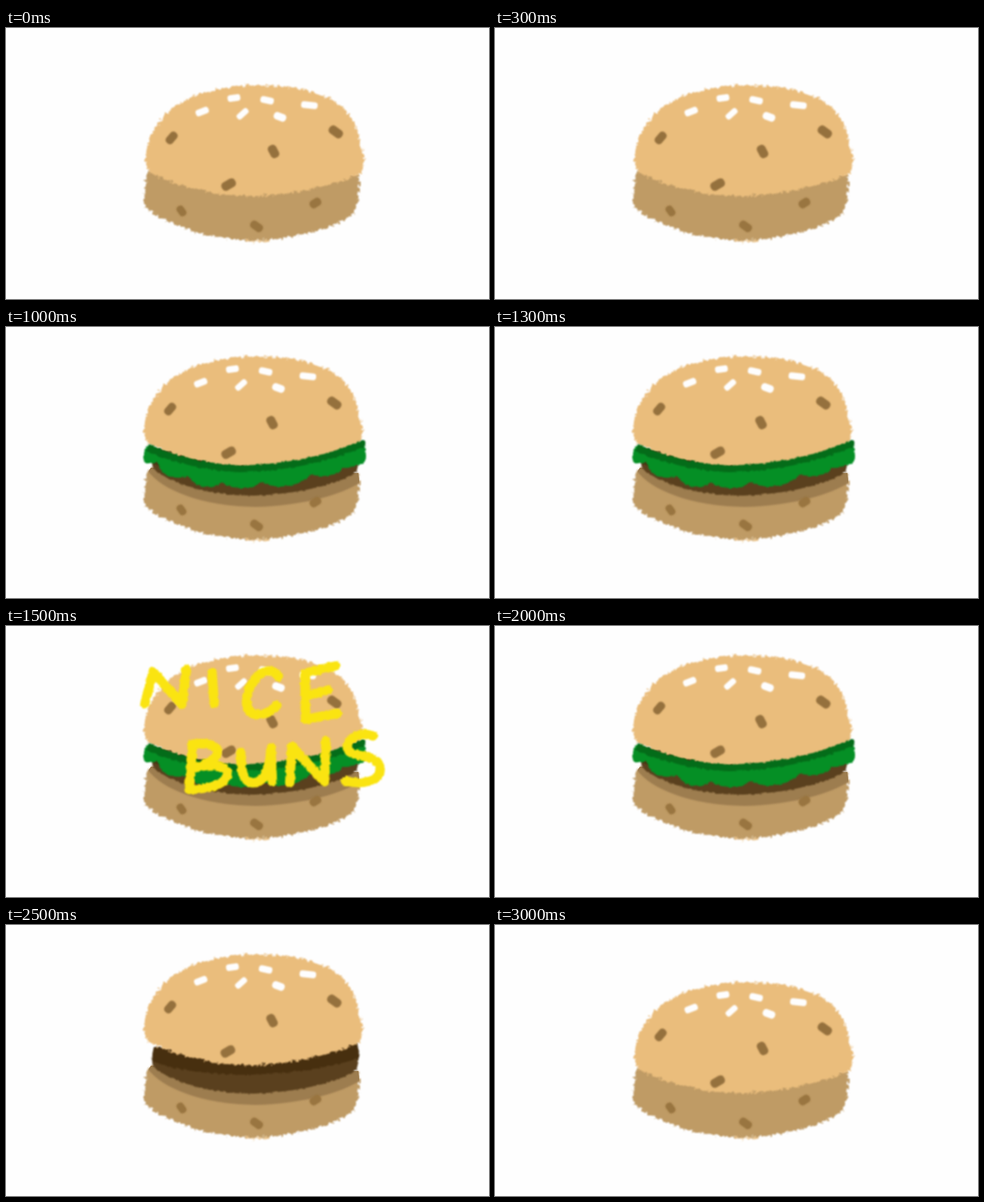
Write an HTML page that moves like this. It is 640 by 360 pixels and loops after 3500 ms.

```html
<!DOCTYPE html>
<html lang="en">
<head>
<meta charset="utf-8">
<title>Burger</title>
<style>
  html, body { margin: 0; width: 100%; height: 100%; overflow: hidden; background: #fefefe; }
  svg { display: block; width: 100vw; height: 100vh; }
  #words path { fill: none; stroke: #fae411; stroke-width: 12.5; stroke-linecap: round; stroke-linejoin: round; }
</style>
</head>
<body>
<svg viewBox="0 0 640 360">
  <defs>
    <filter id="chalk" filterUnits="userSpaceOnUse" x="0" y="0" width="640" height="360" color-interpolation-filters="sRGB">
      <feTurbulence type="fractalNoise" baseFrequency=".22" numOctaves="3" seed="4"/>
      <feDisplacementMap in="SourceGraphic" scale="9" xChannelSelector="R" yChannelSelector="G"/>
      <feGaussianBlur stdDeviation=".8"/>
    </filter>
    <filter id="brush" filterUnits="userSpaceOnUse" x="0" y="0" width="640" height="360" color-interpolation-filters="sRGB">
      <feTurbulence type="fractalNoise" baseFrequency=".2" numOctaves="2" seed="9"/>
      <feDisplacementMap in="SourceGraphic" scale="4" xChannelSelector="R" yChannelSelector="G"/>
      <feGaussianBlur stdDeviation=".9"/>
    </filter>
    <filter id="soft" filterUnits="userSpaceOnUse" x="0" y="0" width="640" height="360">
      <feGaussianBlur stdDeviation="1.2"/>
    </filter>
    <clipPath id="baseClip">
      <path id="baseShape" d="M192 187C184 196 182 222 184 236C194 250 238 271 288 279C318 283 347 283 374 278C412 271 440 262 457 250C467 241 470 214 467 194Z"/>
    </clipPath>
  </defs>

  <g filter="url(#chalk)">
    <use href="#baseShape" fill="#bf9b65"/>
    <path d="M318 282.500Q334 284.500 349 282" fill="none" stroke="#eabd7c" stroke-width="1.500"/>
  </g>

  <g id="patty">
    <path clip-path="url(#baseClip)" filter="url(#soft)" fill="#9d7d50"
      d="M187 190C206 217 260 238 330 239C390 238 445 223 470 206V180H190Z"/>
    <g filter="url(#brush)">
      <path fill="#5a401e" d="M196 163C193 173 193 182 195 188C222 211 272 224 328 224C388 222 440 209 464 193C468 183 468 170 466 156L330 170Z"/>
      <path fill="#472f0f" d="M196 162C194 169 194 176 195 181C222 193 272 199 322 199C382 197 432 189 467 177C468 169 468 162 466 156L330 170Z"/>
    </g>
  </g>
  <g id="baseSpots" filter="url(#soft)" fill="#99753f"></g>

  <g id="lid">
    <path filter="url(#chalk)" fill="#eabd7c"
      d="M185 172C186 150 196 129 214 113C238 89 280 76 335 76C385 76 428 87 448 107C463 123 470 148 474 172C475 184 472 191 466 196C430 210 380 222 325 223.500C270 223 216 207 191 191C186 187 185 180 185 172Z"/>
    <g id="lidSpots" filter="url(#soft)" fill="#95713e"></g>
    <g id="seeds" filter="url(#soft)" fill="#fefefe"></g>
  </g>
  <g id="lowSpot" filter="url(#soft)" fill="#95713e"></g>

  <g id="leaf" filter="url(#brush)">
    <path fill="#058f25"
      d="M188 156C180 164 181 175 184 180Q190 184 200 179Q206 199 225 200Q234 201 241 197Q247 210 265 212Q277 213 286 206Q297 214 312 214Q328 214 338 206Q350 212 366 212Q391 210 404 196Q420 200 433 196Q442 194 446 187Q456 188 465 183Q478 183 477 170L474 151Q400 183 310 185Q240 180 188 156Z"/>
    <path fill="#046c19"
      d="M188 155Q240 180 310 184Q400 182 474 150Q478 152 475 159Q400 191 310 193Q240 189 187 165Z"/>
  </g>

  <g id="words" filter="url(#brush)" role="img" aria-label="NICE BUNS">
    <path d="M184 103L195 61L233 104L239 58"/>
    <path d="M273 62L276 103"/>
    <path d="M361 67C353 56 340 58 330 71C317 88 314 111 328 117C340 120 351 114 359 105"/>
    <path d="M436 53L396 63L397 124L439 116M398 93L427 85"/>
    <path d="M247 157L243 217M247 157C268 154 284 160 280 170C276 179 264 184 252 188C278 181 296 187 293 199C289 212 264 217 243 217"/>
    <path d="M311 168C311 190 314 206 325 208C341 210 350 192 351 162L353 207"/>
    <path d="M376 208L379 160L422 207L424 153"/>
    <path d="M486 146C470 140 453 149 452 160C452 171 468 171 482 175C498 180 499 195 490 202C480 209 464 209 450 206"/>
  </g>
</svg>

<script>
  const $ = id => document.getElementById(id);

  // Each blob: x, y, angle, half length, half width
  function blobs(id, list) {
    $(id).innerHTML = list.map(([x, y, turn, a, b]) =>
      `<rect x="${-a}" y="${-b}" width="${2 * a}" height="${2 * b}" rx="${b * .85}"
        transform="translate(${x} ${y}) rotate(${turn})"/>`).join('');
  }
  blobs('seeds', [
    [260, 111, -22, 9, 4.5], [302, 93, -8, 8.5, 4.5], [346, 96, 12, 9, 4.5],
    [402, 102.5, 6, 11, 4.5], [313.5, 114, -42, 9, 4], [363, 118, 20, 8.5, 5]
  ]);
  blobs('lidSpots', [[219.5, 146, -50, 9, 5.5], [354.5, 164, 62, 9, 6], [437, 138, 35, 10, 6]]);
  blobs('lowSpot', [[295, 208, -30, 10, 6]]);
  blobs('baseSpots', [[232.5, 243, 55, 7.5, 5], [332, 263.5, 35, 9, 5.5], [410, 232.5, -32, 8, 5.5]]);

  // Layers are stacked up to the lettering, then taken off again
  const levels = [0, 1, 2, 3, 2, 1, 0];
  function play(id, pose) {
    const frames = [...levels, levels[0]].map((level, i) =>
      ({ ...pose(level), offset: i / levels.length, easing: 'step-end' }));
    $(id).animate(frames, { duration: 3500, iterations: Infinity }).startTime = 0;
  }
  const from = min => level => ({ opacity: level >= min ? 1 : 0 });
  play('patty', from(1));
  play('leaf', from(2));
  play('words', from(3));
  play('lid', level => ({ transform: level ? 'translate(-2px, -37px)' : 'translate(0px, 0px)' }));
  play('lowSpot', level => ({
    transform: level ? `translate(${level > 1 ? 0 : -1}px, ${level > 1 ? -41 : -40}px)` : 'translate(0px, 0px)'
  }));
</script>
</body>
</html>
```
